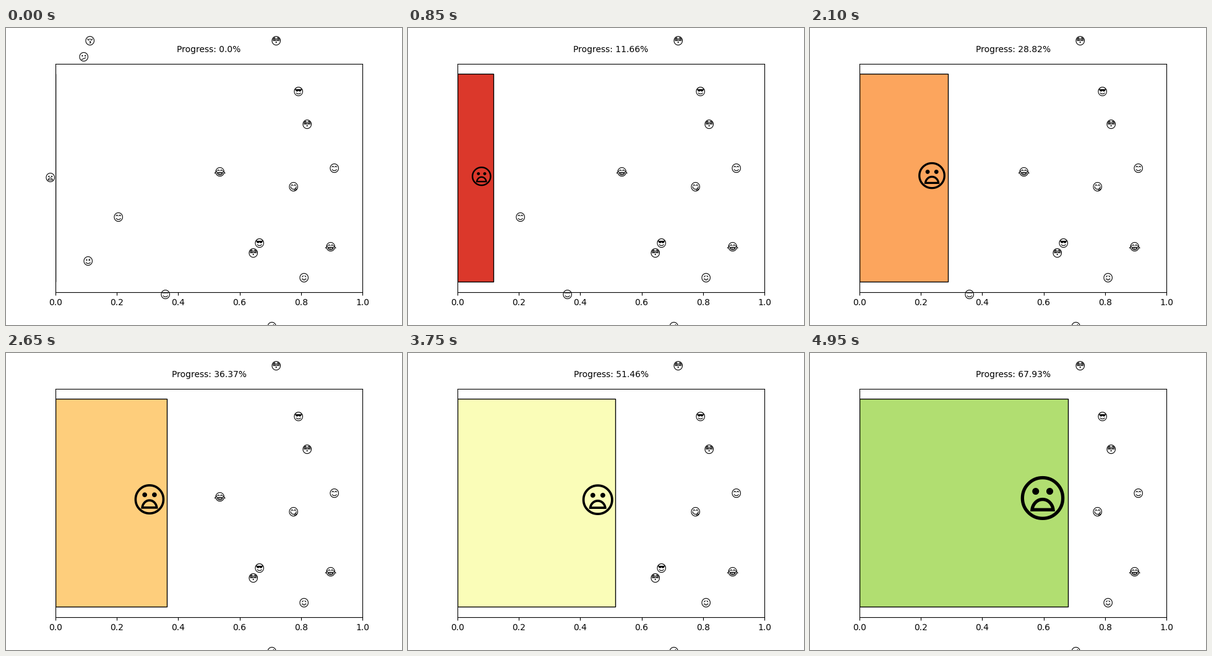
A matplotlib script that plays this animation: 640x480 px, repeating every 5000 ms.

```python
import numpy as np
import matplotlib.pyplot as plt
from matplotlib.animation import FuncAnimation

plt.rcParams["font.family"] = "DejaVu Sans"

W, H, DPI = 640, 480, 100
FRAMES, INTERVAL = 100, 50
STEP = 0.0068615        # progress gained per frame
LEFT, SPAN = 80, 496    # axes left edge and width in pixels
FACE_SIZE = 12

# left edge and vertical centre of each snack, in pixels from the top left
SNACKS = [
    ("😚", 126.8, 21.5), ("😕", 116.8, 47.5), ("😉", 123.8, 377.5),
    ("😊", 172.8, 306.5), ("😊", 249.0, 431.5), ("😂", 334.8, 233.5),
    ("😳", 390.8, 364.5), ("😎", 400.8, 348.5), ("😳", 427.8, 21.5),
    ("😜", 420.8, 483.5), ("😋", 455.8, 257.5), ("😎", 463.8, 103.5),
    ("😖", 472.8, 404.5), ("😳", 477.8, 156.5), ("😂", 513.8, 354.5),
    ("😊", 521.8, 227.5),
]

# the eater's font size at a few moments
GROW_AT = [0, 17, 22, 28, 33, 44, 53, 74, 75, 99]
GROW_TO = [12, 26, 29, 31, 36, 36, 40, 40, 41, 58]

fig, ax = plt.subplots(figsize=(W / DPI, H / DPI), dpi=DPI)
ax.set_xlim(0, 1)
ax.set_ylim(-0.44, 0.44)
ax.set_yticks([])

bar = ax.barh(0, 0, height=0.8, edgecolor="black", linewidth=1)[0]
title = ax.text(0.5, 1.05, "", transform=ax.transAxes, ha="center")
eater = ax.text(0, 0, "😦", ha="right", va="center", fontsize=FACE_SIZE)


def add_snack(face, x, y):
    return fig.text(x / W, 1 - y / H, face, ha="left", va="center",
                    fontsize=FACE_SIZE)


snacks = [(x, add_snack(face, x, y)) for face, x, y in SNACKS]


def update(frame):
    progress = frame * STEP
    bar.set_width(progress)
    bar.set_facecolor(plt.cm.RdYlGn(progress))
    title.set_text(f"Progress: {round(progress * 100, 2)}%")
    eater.set_x(progress)
    eater.set_fontsize(int(np.interp(frame, GROW_AT, GROW_TO)))
    for x, snack in snacks:
        snack.set_visible(x > LEFT + SPAN * progress)
    return [bar, title, eater] + [snack for _, snack in snacks]


anim = FuncAnimation(fig, update, frames=FRAMES, interval=INTERVAL,
                     repeat=True, repeat_delay=0)
plt.show()
```
